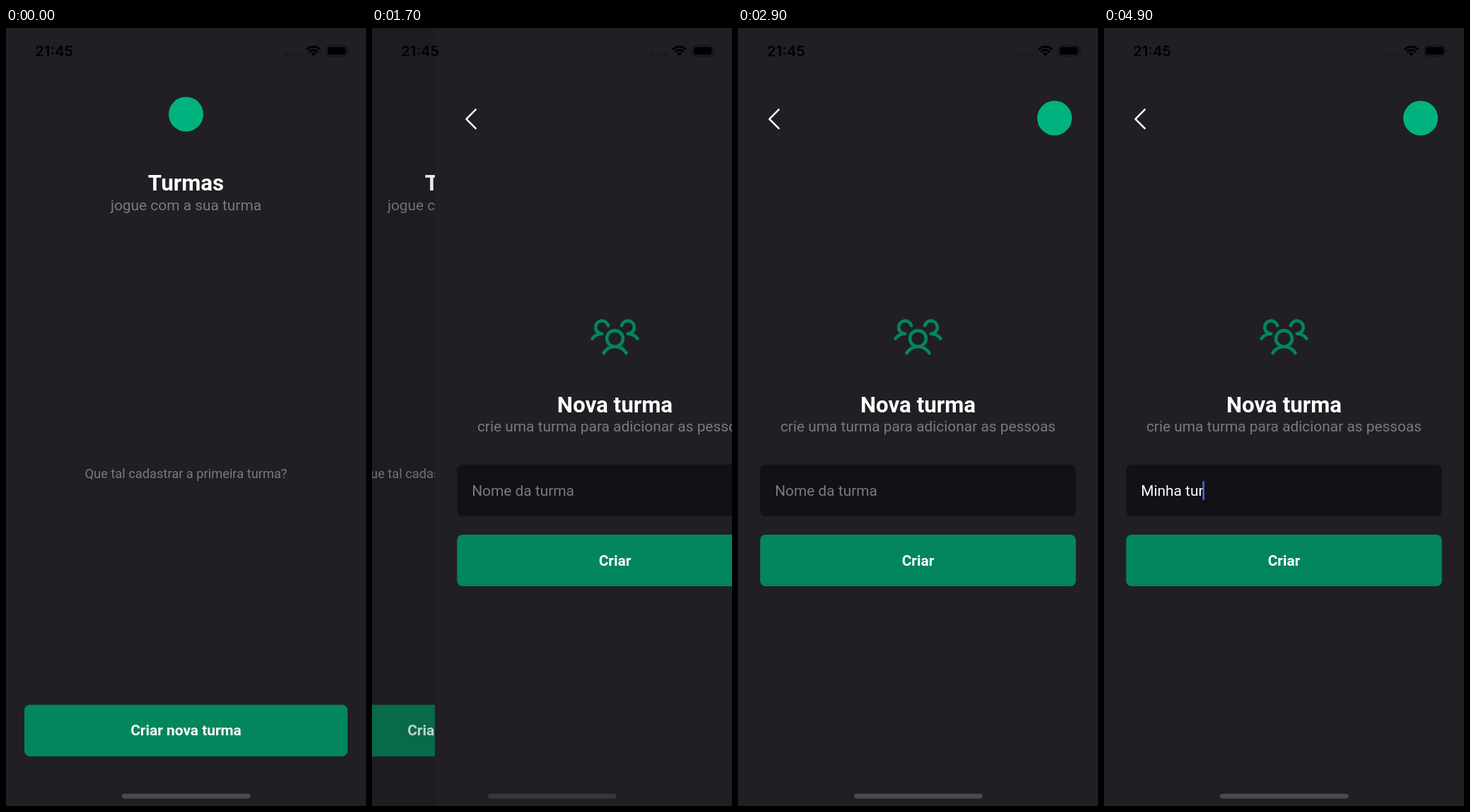
An HTML page with a canvas for the animation above (5000 ms loop, 509x1101 px).

```html
<!DOCTYPE html>
<html lang="pt-BR">
<head>
<meta charset="utf-8">
<title>Turmas</title>
<style>
html, body { margin: 0; width: 100%; height: 100%; overflow: hidden; background: #211f24; }
canvas { display: block; width: 509px; height: 1101px; }
</style>
</head>
<body>
<canvas id="stage"></canvas>
<script>
const W = 509, H = 1101, MID = W / 2, LOOP = 5000, STEP = 100;
const PUSH = 1533;        // finger lifts, new page starts sliding in
const BG = '#211f24', GREEN = '#03865d', BADGE = '#00b37e', GRAY = '#7a7983';
const WHITE = '#ffffff', FIELD = '#121115', CARET = '#3f6ae6';
const PT = W / 390;       // phone points to stage pixels

const canvas = document.getElementById('stage');
const dpr = window.devicePixelRatio || 1;
canvas.width = Math.round(W * dpr);
canvas.height = Math.round(H * dpr);
const ctx = canvas.getContext('2d');

// time at which each character of the field is typed
const KEYS = [
  [3700, 'M'], [3800, 'i'], [4000, 'n'], [4200, 'h'], [4300, 'a'],
  [4400, ' '], [4500, 't'], [4700, 'u'], [4900, 'r']
];

const groupIcon = new Path2D(
  'M192,120a59.91,59.91,0,0,1,48,24 M16,144a59.91,59.91,0,0,1,48-24 ' +
  'M168,144a40,40,0,1,1-80,0a40,40,0,1,1,80,0 M72,216a65,65,0,0,1,112,0 ' +
  'M161,80a32,32,0,1,1,31,40 M64,120A32,32,0,1,1,95,80'
);

function box(x, y, w, h, r, color) {
  ctx.fillStyle = color;
  ctx.beginPath();
  ctx.roundRect(x, y, w, h, r);
  ctx.fill();
}

function disc(x, y, r, color) {
  ctx.fillStyle = color;
  ctx.beginPath();
  ctx.arc(x, y, r, 0, Math.PI * 2);
  ctx.fill();
}

function label(str, x, y, points, weight, color, align = 'center') {
  ctx.font = `${weight} ${points * PT}px Roboto, sans-serif`;
  ctx.textAlign = align;
  ctx.fillStyle = color;
  ctx.fillText(str, x, y);
}

// critically damped spring, 1 to 0
function slideAt(t) {
  if (t <= PUSH) return 1;
  const k = 19 * (t - PUSH) / 1000;
  return (1 + k) * Math.exp(-k);
}

function pressAt(t) {
  if (t < 1400) return 1;
  const u = Math.min(1, Math.max(0, (t - PUSH) / 250));
  const ease = u < 0.5 ? 2 * u * u : 1 - 2 * (1 - u) * (1 - u);
  return 0.2 + 0.8 * ease;
}

function caretAt(t) {
  if (t < 3000) return 0;
  if (t < 3100) return 0.5;
  if (t < 3500) return 1;
  if (t < 3600) return 0.5;
  return t < 3700 ? 0 : 1;
}

function drawHome(t) {
  disc(MID, 122, 24.5, BADGE);
  label('Turmas', MID, 230.4, 24, 700, WHITE);
  label('jogue com a sua turma', MID, 257.7, 16, 400, GRAY);
  label('Que tal cadastrar a primeira turma?', MID, 636.7, 14, 400, GRAY);
  ctx.globalAlpha = pressAt(t);
  box(26, 957.7, 457, 73, 6 * PT, GREEN);
  label('Criar nova turma', MID, 1001.4, 16, 700, WHITE);
  ctx.globalAlpha = 1;
}

function drawField(t) {
  const x = 52.2, y = 662;
  box(31.3, 617.8, 446.4, 73, 6 * PT, FIELD);
  const typed = KEYS.filter(k => t >= k[0]).map(k => k[1]).join('');
  label(typed || 'Nome da turma', x, y, 16, 400, typed ? WHITE : GRAY, 'left');
  const end = x + (typed ? ctx.measureText(typed).width : 0);
  ctx.globalAlpha = caretAt(t);
  box(end - 1.1, 641, 2.6, 27, 1.3, CARET);
  ctx.globalAlpha = 1;
}

function drawForm(t) {
  ctx.fillStyle = BG;
  ctx.fillRect(0, 0, W, H);
  ctx.lineCap = ctx.lineJoin = 'round';

  ctx.strokeStyle = WHITE;
  ctx.lineWidth = 2.5;
  ctx.beginPath();
  ctx.moveTo(57.7, 115.3);
  ctx.lineTo(44.4, 128.8);
  ctx.lineTo(57.7, 142.2);
  ctx.stroke();

  disc(447.6, 127.5, 24.5, BADGE);

  ctx.save();
  ctx.translate(MID - 28 * PT, 398.4);
  ctx.scale(56 * PT / 256, 56 * PT / 256);
  ctx.strokeStyle = GREEN;
  ctx.lineWidth = 16;
  ctx.stroke(groupIcon);
  ctx.restore();

  label('Nova turma', MID, 544, 24, 700, WHITE);
  label('crie uma turma para adicionar as pessoas', MID, 571.3, 16, 400, GRAY);
  drawField(t);
  box(31.3, 717, 446.4, 73, 6 * PT, GREEN);
  label('Criar', MID, 760.9, 16, 700, WHITE);
}

function drawWifi() {
  const x = 434.6, y = 39.6, a = Math.PI * 0.26;
  ctx.lineCap = 'butt';
  ctx.strokeStyle = '#000';
  ctx.lineWidth = 3;
  for (const r of [8.4, 13.2]) {
    ctx.beginPath();
    ctx.arc(x, y, r, -Math.PI / 2 - a, -Math.PI / 2 + a);
    ctx.stroke();
  }
  ctx.fillStyle = '#000';
  ctx.beginPath();
  ctx.moveTo(x, y);
  ctx.arc(x, y, 5, -Math.PI / 2 - a, -Math.PI / 2 + a);
  ctx.fill();
}

function drawSystem(t) {
  ctx.font = '600 20.4px Inter, sans-serif';
  ctx.textAlign = 'center';
  ctx.fillStyle = '#000';
  ctx.fillText('21:45', 68, 39.7);

  for (let i = 0; i < 4; i++) disc(397 + i * 6.1, 37.6, 1.7, '#161518');
  drawWifi();

  ctx.strokeStyle = '#121114';
  ctx.lineWidth = 1.2;
  ctx.beginPath();
  ctx.roundRect(453.2, 25, 29, 14.6, 4.4);
  ctx.stroke();
  box(455, 26.8, 25.4, 11, 2.8, '#000');
  box(483.4, 30, 1.6, 5, 0.8, '#121114');

  const moved = t >= 1600 && t < 2900;
  box(164, 1083.8, 181.6, 6.6, 3.3, moved ? '#39373b' : '#4c4a4d');
}

function draw(t) {
  const left = slideAt(t), x = left * W;
  ctx.setTransform(canvas.width / W, 0, 0, canvas.height / H, 0, 0);
  ctx.fillStyle = BG;
  ctx.fillRect(0, 0, W, H);

  // old page drifts at a third of the speed and dims
  ctx.save();
  ctx.translate(-0.3 * (W - x), 0);
  drawHome(t);
  ctx.restore();
  ctx.fillStyle = `rgba(0,0,0,${0.1 * (1 - left)})`;
  ctx.fillRect(0, 0, W, H);

  if (left < 1) {
    ctx.save();
    ctx.translate(x, 0);
    drawForm(t);
    ctx.restore();
  }
  drawSystem(t);
}

const start = performance.now();
function tick() {
  const t = (performance.now() - start) % LOOP;
  draw(Math.floor(t / STEP) * STEP);
  requestAnimationFrame(tick);
}
tick();
</script>
</body>
</html>
```
